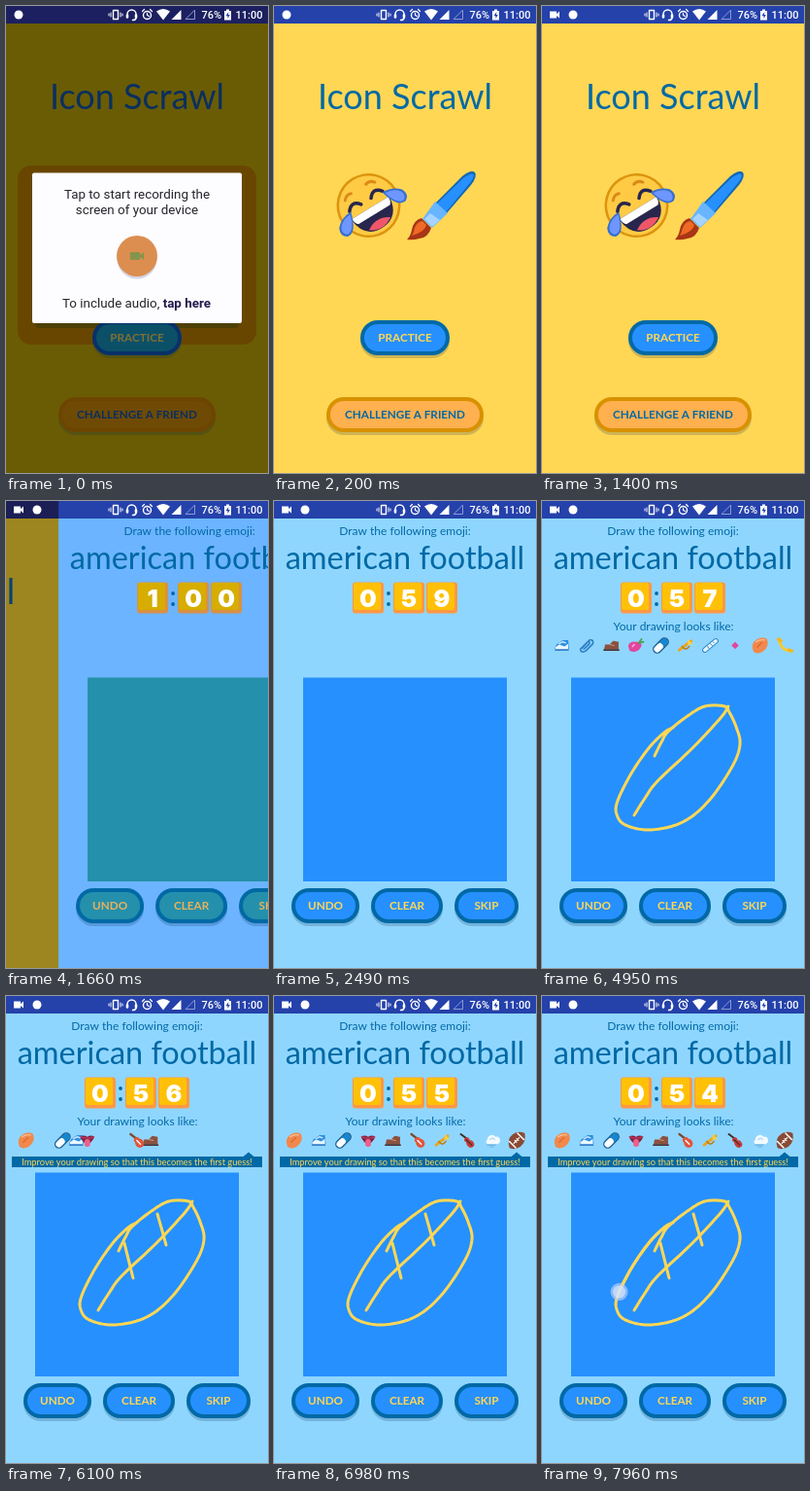
Write an HTML page with a canvas that moves like this. It is 270 by 480 pixels and loops after 7.99 s.

```html
<!DOCTYPE html>
<html lang="en">
<head>
<meta charset="utf-8">
<title>Drawing game</title>
<style>
html, body { margin: 0; width: 100%; height: 100%; overflow: hidden; background: #ffd754; }
canvas { display: block; width: 270px; height: 480px; }
</style>
</head>
<body>
<canvas id="stage" width="270" height="480"></canvas>
<script>
const c = document.getElementById('stage').getContext('2d');
const LOOP = 7990, NAVY = '#0069a5', YELLOW = '#ffd754';
const clamp = (v) => Math.max(0, Math.min(1, v));
const span = (t, a, b) => clamp((t - a) / (b - a));
const ease = (p) => p * p * (3 - 2 * p);

// ---- drawing helpers ----
function mix(a, b, k) {
  const part = (s, i) => parseInt(s.slice(i, i + 2), 16);
  return 'rgb(' + [1, 3, 5].map((i) => Math.round(part(a, i) + (part(b, i) - part(a, i)) * k)) + ')';
}
function box(x, y, w, h, r, fill) {
  c.fillStyle = fill;
  c.beginPath();
  c.roundRect(x, y, w, h, r);
  c.fill();
}
function disc(x, y, r, fill) {
  c.fillStyle = fill;
  c.beginPath();
  c.arc(x, y, r, 0, 7);
  c.fill();
}
function text(s, x, y, size, fill, font = 'Lato, sans-serif', weight = 400, align = 'center') {
  c.font = `${weight} ${size}px ${font}`;
  c.textAlign = align;
  c.fillStyle = fill;
  c.fillText(s, x, y);
}
function button(x, y, w, label, edge, fill, ink) {
  box(x, y + 3, w, 36, 18, 'rgba(0,40,80,.2)');
  box(x, y, w, 36, 18, edge);
  box(x + 4, y + 4, w - 8, 28, 14, fill);
  text(label, x + w / 2, y + 22, 11.7, ink, undefined, 700);
}
// Each part is [path, colour, line width]; no width means a filled shape.
function parts(list, x, y, scale = 1, turn = 0) {
  c.save();
  c.translate(x, y);
  c.rotate(turn);
  c.scale(scale, scale);
  c.lineCap = c.lineJoin = 'round';
  for (const [d, colour, width] of list) {
    const p = new Path2D(d);
    c.fillStyle = c.strokeStyle = colour;
    if (width) { c.lineWidth = width; c.stroke(p); } else c.fill(p);
  }
  c.restore();
}

// ---- pictures ----
const art = {
  sneaker: [['M-8 4L-6-1L1-6L7-6L8 4Z', '#2e8fe0'], ['M-7 2L-3-1L3 1L7-2V4H-7Z', '#e8f6ff'], ['M-3-2L1-4L4-3', '#bfe2ff', 1.6], ['M-7 5H7', '#1d62b8', 1.5]],
  clip: [['M-5 3L3-6Q8-7 7-2L-1 6Q-6 9-7 4L1-4Q4-5 3-2L-3 4', '#2d7fc4', 1.7]],
  shoe: [['M-8 4L-7-1L-2-1L2-5L8-4V4Z', '#8b5140'], ['M-8 5H8', '#4a3030', 2], ['M-2-1L3 0', '#d8a080', 1]],
  dart: [['M-8 3A6 5 0 0 1-1-4Q6-5 6 0Q4 7-3 7Q-8 7-8 3Z', '#e0479d'], ['M3-3L6-7M4-3L8-4', '#49a352', 2], ['M-4 1L-2-1', '#ffb5dc', 1.5]],
  pill: [['M-4 4L4-4', '#26547d', 10], ['M-4 4L4-4', '#1687cf', 8], ['M-4 4L-1 1', '#fff', 7]],
  trumpet: [['M-7 5L6-5', '#e9a51c', 3], ['M3-7L8-1L2-1Z', '#ffcf3e'], ['M-4 1Q0 7 4 1', '#c07a10', 1.6]],
  ruler: [['M-6 5L6-5', '#2f83c5', 6], ['M-6 5L6-5', '#e3f5ff', 4], ['M-3 1L-2 3M0-2L2 0M3-4L4-3', '#2f83c5', 1]],
  gem: [['M0-4L4 0L0 4L-4 0Z', '#e0479d']],
  rugby: [['M-7 7Q-11-2-3-7Q4-10 8-7Q11 1 3 7Q-3 10-7 7Z', '#f2884b'], ['M-4-4Q0-7 5-6', '#ffc296', 1.4], ['M-3 2L2-3', '#d9632b', 1.2]],
  banana: [['M-6-6Q-4 5 6 6', '#ffc928', 3], ['M-7-7L-4-5M5 5L8 6', '#f5b81f', 3.6]],
  mouth: [['M-8-4Q-4-7 0-4Q4-7 8-4Q4 4 0 4Q-4 4-8-4Z', '#7c2440'], ['M-3 0Q0-3 3 0V5Q0 9-3 5Z', '#ef5f8b'], ['M-7-4Q0-1 7-4', '#c8365d', 1.5]],
  guitar: [['M1-1L-7-7', '#7c4933', 2.4], ['M8 3Q7-2 3-2Q2-5-2-3Q-5 0-2 2Q-2 7 3 8Q8 8 8 3Z', '#e2553b'], ['M4 4L0 0', '#fff', 1.5]],
  violin: [['M1-1L-7-7', '#3d2a2a', 2], ['M8 4Q6-1 3 0Q2-5-2-3Q-5 0-1 2Q-1 6 3 8Q8 8 8 4Z', '#c43d3a'], ['M5 5L-1-1', '#3d2a2a', 1.2]],
  cloud: [['M-5 4A3 3 0 0 1-5-1A5 5 0 0 1 4-4A4 4 0 0 1 6 4Z', '#f3faff'], ['M-5 5H4M-2 7H2', '#6dafe0', 1.3], ['M-2-1Q1-4 3-1', '#a5d3f3', 1.2]],
  football: [['M-8 8Q-11-2-4-7Q2-11 9-8Q11 2 4 7Q-2 11-8 8Z', '#8a4a35'], ['M-8 1L-1 8M1-8L8-1', '#fff', 1.6], ['M-3 3L3-3M-2 0L0 2M0-2L2 0', '#fff', 1.2]]
};
const laugh = [
  ['M-33 0A33 33 0 1 1 33 0A33 33 0 1 1-33 0Z', '#dc930e'],
  ['M-30.5 0A30.5 30.5 0 1 1 30.5 0A30.5 30.5 0 1 1-30.5 0Z', '#ffcb45'],
  ['M-18-17Q-14-22-9-20M9-20Q14-22 18-17', '#db8a18', 3],
  ['M-20-5Q-13-14-6-5M6-5Q13-14 20-5', '#28264d', 3.5],
  ['M-23 3H23Q21 27 0 27Q-21 27-23 3Z', '#28264d'],
  ['M-22 3H22Q22 9 19 11H-19Q-22 9-22 3Z', '#fff'],
  ['M-13 22Q0 13 13 22Q0 31-13 22Z', '#f0566a'],
  ['M-19-4Q-31-4-38 4Q-42 12-35 16Q-25 18-19-4ZM19-4Q31-4 38 4Q42 12 35 16Q25 18 19-4Z', '#3670d0'],
  ['M-21-2Q-31-2-36 5Q-39 11-34 14Q-26 15-21-2ZM21-2Q31-2 36 5Q39 11 34 14Q26 15 21-2Z', '#6e96ff']
];
const brush = [
  ['M-8 0L22-30Q31-37 35-34Q38-30 31-21L5 9Z', '#1268b5'],
  ['M-6 0L23-28Q31-34 33.500-32Q35-29 29-22L5 7Z', '#2690ff'],
  ['M-19 14L-6-4L7 8L-9 23Z', '#68b5ff'],
  ['M-17 14L-11 8L-1 15L-9 22Z', '#a4d4ff'],
  ['M-35 35Q-31 31-30 25Q-28 15-20 13L-10 23Q-13 33-22 34Q-29 36-35 35Z', '#a83516'],
  ['M-30 31Q-28 28-27 23Q-25 17-19 16L-15 20Q-16 27-30 31Z', '#ee6a25']
];

// ---- pen strokes ----
function curve(...n) {
  const p = [], out = [];
  for (let i = 0; i < n.length; i += 2) p.push([n[i], n[i + 1]]);
  const at = (i) => p[Math.max(0, Math.min(p.length - 1, i))];
  for (let i = 0; i < p.length - 1; i++) {
    for (let j = 0; j <= 12; j++) {
      const u = j / 12;
      out.push([0, 1].map((k) => {
        const [a, b, d, e] = [-1, 0, 1, 2].map((o) => at(i + o)[k]);
        return b + u / 2 * (d - a + u * (2 * a - 5 * b + 4 * d - e + u * (3 * (b - d) + e - a)));
      }));
    }
  }
  return out;
}
// Points up to the share f of the length.
function upTo(pts, f) {
  const step = pts.map((q, i) => i ? Math.hypot(q[0] - pts[i - 1][0], q[1] - pts[i - 1][1]) : 0);
  let left = f * step.reduce((a, b) => a + b);
  const out = [pts[0]];
  for (let i = 1; i < pts.length; i++) {
    const u = step[i] ? Math.min(1, left / step[i]) : 1;
    out.push([0, 1].map((k) => pts[i - 1][k] + (pts[i][k] - pts[i - 1][k]) * u));
    left -= step[i];
    if (left <= 0) break;
  }
  return out;
}
const outline = curve(135, 233, 126, 238, 110, 254, 92, 280, 78, 308, 77, 322, 86, 333, 112, 338, 145, 330, 172, 308,
  196, 273, 204, 250, 200, 232, 193, 217, 188, 211, 168, 211, 150, 221, 130, 237, 123, 248, 116, 262);
const strokes = [
  { pts: outline, start: 2780, end: 3950, share: (t) => t < 3460 ? 0.755 * span(t, 2780, 3460) : 0.755 + 0.245 * span(t, 3460, 3950) },
  { pts: curve(192, 211, 184, 223, 155, 254, 119, 288, 107, 304, 95, 323), start: 4400, end: 4850 },
  { pts: curve(122, 254, 126, 270, 131, 290), start: 5130, end: 5290 },
  { pts: curve(156, 224, 160, 238, 165, 256), start: 5480, end: 5660 },
  { pts: outline, start: 7280, end: 8600, share: (t) => t < 7500 ? 0.09 * span(t, 7280, 7500) : 0.09 + 0.125 * span(t, 7500, 7960) }
];
function touch(x, y) {
  disc(x, y, 9, 'rgba(190,210,245,.65)');
  disc(x, y, 6.5, 'rgba(225,235,255,.6)');
}
function drawStrokes(t) {
  c.strokeStyle = YELLOW;
  c.lineWidth = 3;
  c.lineCap = c.lineJoin = 'round';
  for (const s of strokes) {
    if (t < s.start) continue;
    const line = upTo(s.pts, s.share ? s.share(t) : span(t, s.start, s.end));
    c.beginPath();
    line.forEach((q) => c.lineTo(...q));
    c.stroke();
    if (t < s.end) touch(...line.at(-1));
  }
}

// ---- guesses ----
const rows = [
  [0, ''],
  [4350, 'sneaker clip shoe dart pill trumpet ruler gem rugby banana'],
  [5300, 'rugby pill mouth sneaker guitar clip shoe ruler gem football'],
  [5930, 'rugby sneaker pill mouth shoe guitar trumpet violin cloud football']
].map(([start, names]) => ({ start, names: names.split(' ') }));
const slot = (i) => 20.5 + i * 25.5;

function drawGuesses(t) {
  const n = rows.findLastIndex((r) => t >= r.start);
  if (!n) return;
  const now = rows[n], old = rows[n - 1].names, age = t - now.start;
  // The last slot is always replaced, never moved.
  const kept = (name, list) => { const i = list.indexOf(name); return i < 9 ? i : -1; };
  const put = (name, x, alpha) => {
    if (!art[name] || alpha <= 0) return;
    c.globalAlpha = alpha;
    parts(art[name], x, 148.5, 0.93);
    c.globalAlpha = 1;
  };
  text('Your drawing looks like:', 135.5, 133, 12, NAVY);
  old.forEach((name, i) => {
    if (i > 8 || kept(name, now.names) < 0) put(name, slot(i), 1 - age / 110);
  });
  now.names.forEach((name, i) => {
    const from = i < 9 ? kept(name, old) : -1;
    if (from < 0) put(name, slot(i), span(age, 350, 600));
    else put(name, slot(from) + (slot(i) - slot(from)) * ease(span(age, 0, 350)), 1);
  });
  if (n > 1) {
    c.globalAlpha = span(t, 5300, 5480);
    box(6, 165, 258, 11, 0, NAVY);
    parts([['M-6 0L0-5L6 0Z', NAVY]], 250, 165.5);
    text('Improve your drawing so that this becomes the first guess!', 135, 173.5, 9.3, YELLOW);
    c.globalAlpha = 1;
  }
}

// ---- screens; k runs from dimmed (0) to full colour (1) ----
function home(k) {
  box(0, 0, 270, 480, 0, mix('#6a5c04', YELLOW, k));
  text('Icon Scrawl', 135, 106, 36, mix('#0a2f60', NAVY, k));
  c.globalAlpha = k;
  parts(laugh, 97.5, 205, 1, -0.55);
  parts(brush, 172, 205);
  c.globalAlpha = 1;
}
function homeButtons(t, k) {
  button(89, 323, 92, 'PRACTICE', mix('#08316a', NAVY, k), mix('#0c5068', '#2690ff', k), mix('#7d7035', YELLOW, k));
  button(54, 402, 162, 'CHALLENGE A FRIEND', mix('#6c4600', '#d99100', k), mix('#6e4a04', '#ffb04f', k), mix('#0a2f60', NAVY, k));
  if (t > 1120 && t < 1330) touch(138, 341);
}
function dialogShadow(alpha) {
  c.globalAlpha = alpha;
  box(12, 164, 246, 184, 14, '#694600');
  box(30, 320, 210, 11, 4, '#4d4000');
  c.globalAlpha = 1;
}
function dialog(alpha) {
  const font = 'Roboto, sans-serif', ink = '#25252b', size = 13.4;
  c.globalAlpha = alpha;
  box(27, 171.5, 216, 154.5, 2, '#fdfcff');
  text('Tap to start recording the', 135, 198, size, ink, font);
  text('screen of your device', 135, 214, size, ink, font);
  disc(135, 260, 20.5, '#d5d5e4');
  disc(135, 257, 21, '#dc8e50');
  parts([['M-7-4H3V-1L7-4V4L3 1V4H-7Z', '#85944c']], 135, 257);
  text('To include audio, ', 58, 310, size, ink, font, 400, 'left');
  const w = c.measureText('To include audio, ').width;
  text('tap here', 58 + w, 310, size, '#201b4c', font, 700, 'left');
  c.globalAlpha = 1;
}
function game(t, k) {
  box(0, 0, 270, 480, 0, mix('#6cb4ff', '#8fd6ff', k));
  text('Draw the following emoji:', 135, 35, 12, NAVY);
  text('american football', 135, 70, 32.5, NAVY);
  const left = t < 2020 ? 60 : 59 - Math.floor((t - 2020) / 1030);
  const digits = left == 60 ? '100' : '0' + left;
  [81, 123, 157].forEach((x, i) => {
    box(x, 83.5, 32, 32, 3, mix('#d99045', '#ff9845', k));
    box(x + 1, 84, 28, 28, 2, mix('#d6ad00', '#ffc107', k));
    text(digits[i], x + 16, 109, 25, '#fff', 'Inter, sans-serif', 900);
  });
  disc(118, 95, 1.9, NAVY);
  disc(118, 106, 1.9, NAVY);
  box(30, 181.5, 210, 209.5, 0, mix('#2590ab', '#2690ff', k));
  const fill = mix('#2590ab', '#2690ff', k), ink = mix('#e8b25c', YELLOW, k);
  button(18, 398, 70, 'UNDO', NAVY, fill, ink);
  button(100, 398, 74, 'CLEAR', NAVY, fill, ink);
  button(186, 398, 66, 'SKIP', NAVY, fill, ink);
  drawGuesses(t);
  drawStrokes(t);
}
function statusBar(t, k, dimWidth) {
  const w = '#fff';
  box(0, 0, 270, 18, 0, mix('#1c2060', '#2541aa', k));
  box(0, 0, dimWidth, 18, 0, '#1c1f55');
  const recording = t >= 430;
  if (recording) parts([['M-5-3.500H2V-1L5-3.500V3.500L2 1V3.500H-5Z', w]], 13, 9);
  disc(recording ? 32 : 13, 9, 4.5, w);
  parts([['M-2.5-4.5H2.5V4.5H-2.5Z', w, 1.4], ['M-5-2V2M5-2V2M-7-1V1M7-1V1', w, 1]], 113, 9);
  parts([['M-4.5 2V0A4.5 4.5 0 0 1 4.5 0V4Q4 6 1 6', w, 1.5], ['M-4.5 1V3M4.5 1V3', w, 2.6]], 129.5, 8.5);
  parts([['M-4 0A4 4 0 1 1 4 0A4 4 0 1 1-4 0Z', w, 1.4], ['M0-2V0L2 1M-5-4L-3-6M5-4L3-6', w, 1.2]], 145.5, 9.5);
  parts([['M-7-3Q0-8 7-3L0 6Z', w]], 162, 8.5);
  parts([['M-5 5H5V-5Z', w]], 175.5, 9);
  parts([['M-4.5 4.5H4.5V-4.5Z', '#8c9ad2', 1]], 190, 9);
  text('76%', 222, 13, 11, w, 'Roboto, sans-serif', 500, 'right');
  parts([['M-3.5-4H-1.5V-5.5H1.5V-4H3.5V5.5H-3.5Z', w], ['M.8-3L-2 1.2H0V4L2.3 0H.5Z', '#2541aa']], 228.5, 9);
  text('11:00', 264.5, 13, 11, w, 'Roboto, sans-serif', 500, 'right');
}

function frame(now) {
  const t = now % LOOP;
  const open = span(t, 20, 200);
  const slide = 270 * (1 - span(t, 1490, 1830)) ** 2.3;
  const light = t < 1490 ? open : 1 - 0.66 * span(t, 1490, 1640);
  if (slide > 0) {
    c.save();
    c.translate(slide - 270, 0);
    home(light);
    dialogShadow(1 - open);
    homeButtons(t, light);
    dialog(1 - open);
    c.restore();
  }
  if (slide < 270) {
    c.save();
    c.translate(slide, 0);
    game(t, span(t, 1670, 1830));
    c.restore();
  }
  statusBar(t, open, slide < 270 ? slide : 0);
  requestAnimationFrame(frame);
}
requestAnimationFrame(frame);
</script>
</body>
</html>
```
